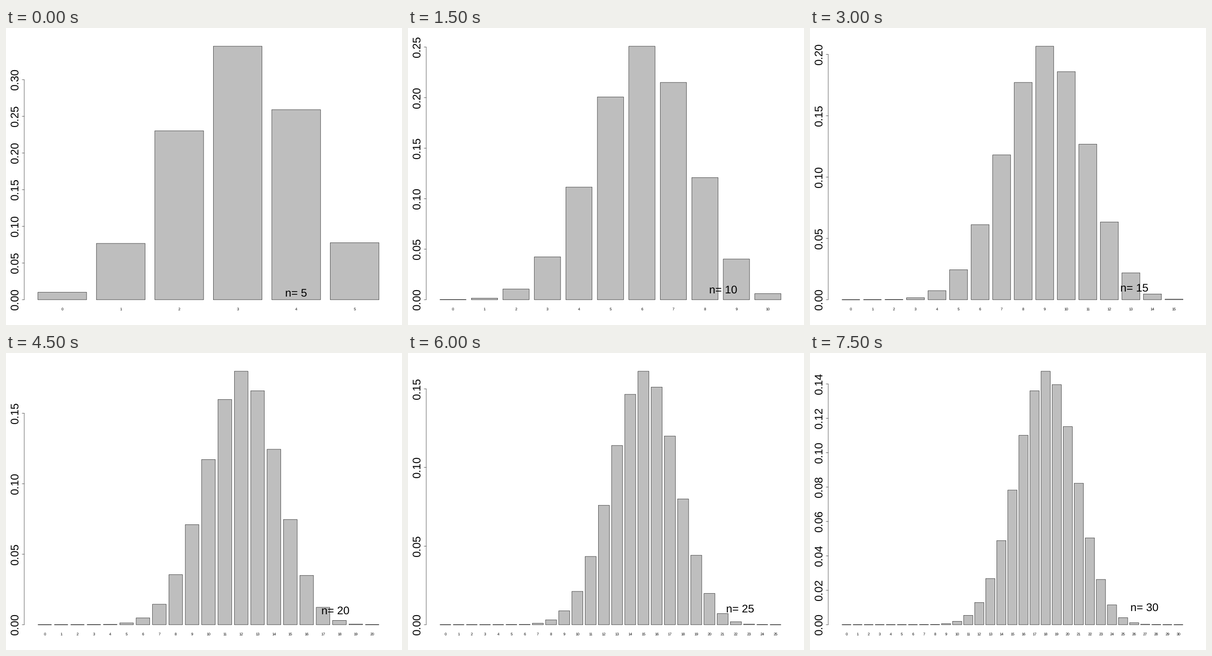
These frames come from a looping animation (864x648 px, 8000 ms). A matplotlib script:

```python
import math

import matplotlib.pyplot as plt
import numpy as np
from matplotlib.animation import FuncAnimation

W, H, DPI = 864, 648, 72          # at 72 dpi one point is one pixel
P = 0.6                           # success probability
STEP_MS, TICK_MS, LOOP_MS = 1500, 500, 8000

LINE = 9.72                       # height of one margin line
LEFT, RIGHT = 4.1 * LINE, W - 2.1 * LINE
TOP, BOTTOM = 4.1 * LINE, H - 5.1 * LINE
BASE = TOP + (BOTTOM - TOP) / 1.01
BAR_SPAN = (RIGHT - LEFT) / 1.08
BAR_LEFT = LEFT + 0.04 * BAR_SPAN
GAP = 0.2
BIG, SMALL = 24.3, 8.1
STROKE = 0.65

plt.rcParams.update({
    "font.family": "Liberation Sans",
    "text.hinting": "none",
    "path.snap": False,
})

fig = plt.figure(figsize=(W / DPI, H / DPI), dpi=DPI, facecolor="white")
ax = fig.add_axes([0, 0, 1, 1])


def binomial(n):
    return np.array([math.comb(n, k) * P**k * (1 - P)**(n - k)
                     for k in range(n + 1)])


def label(x, y, text, size, angle=0):
    ax.text(x, y, text, size=size, rotation=angle, rotation_mode="anchor",
            ha="center", va="baseline", color="black")


def line(xs, ys):
    ax.plot(xs, ys, color="black", lw=STROKE, solid_capstyle="round")


def draw_axis(peak, to_y):
    step = 0.05 if peak > 0.15 else 0.02
    ticks = step * np.arange(int(peak / step) + 1)
    line([LEFT, LEFT], [BASE, to_y(ticks[-1])])
    for value in ticks:
        y = to_y(value)
        line([LEFT - LINE / 2, LEFT], [y, y])
        label(LEFT - 1.2 * LINE, y, f"{value:.2f}", BIG, 90)


def draw_chart(n):
    probs = binomial(n)
    peak = probs.max()
    unit = BAR_SPAN / ((n + 1) * (1 + GAP) - GAP)

    def to_x(value):
        return BAR_LEFT + (value - GAP) * unit

    def to_y(value):
        return BASE - value * (BASE - TOP) / peak

    centers = to_x(GAP + 0.5 + (1 + GAP) * np.arange(n + 1))
    bars = ax.bar(centers, to_y(probs) - BASE, unit, bottom=BASE,
                  facecolor="#bebebe", edgecolor="black", linewidth=STROKE)
    for bar in bars:
        bar.set_joinstyle("round")
    for k, x in enumerate(centers):
        label(x, BOTTOM + 1.8 * LINE, str(k), SMALL)
    draw_axis(peak, to_y)
    label(to_x(1.1 * n), to_y(0.01) + 0.35 * BIG, f"n= {n}", BIG)


def update(frame):
    ax.clear()
    ax.set_axis_off()
    draw_chart(5 + 5 * (frame * TICK_MS // STEP_MS))
    ax.set_xlim(0, W)
    ax.set_ylim(H, 0)
    return []


anim = FuncAnimation(fig, update, frames=LOOP_MS // TICK_MS,
                     init_func=lambda: update(0), interval=TICK_MS,
                     repeat=True, repeat_delay=0)
plt.show()
```
